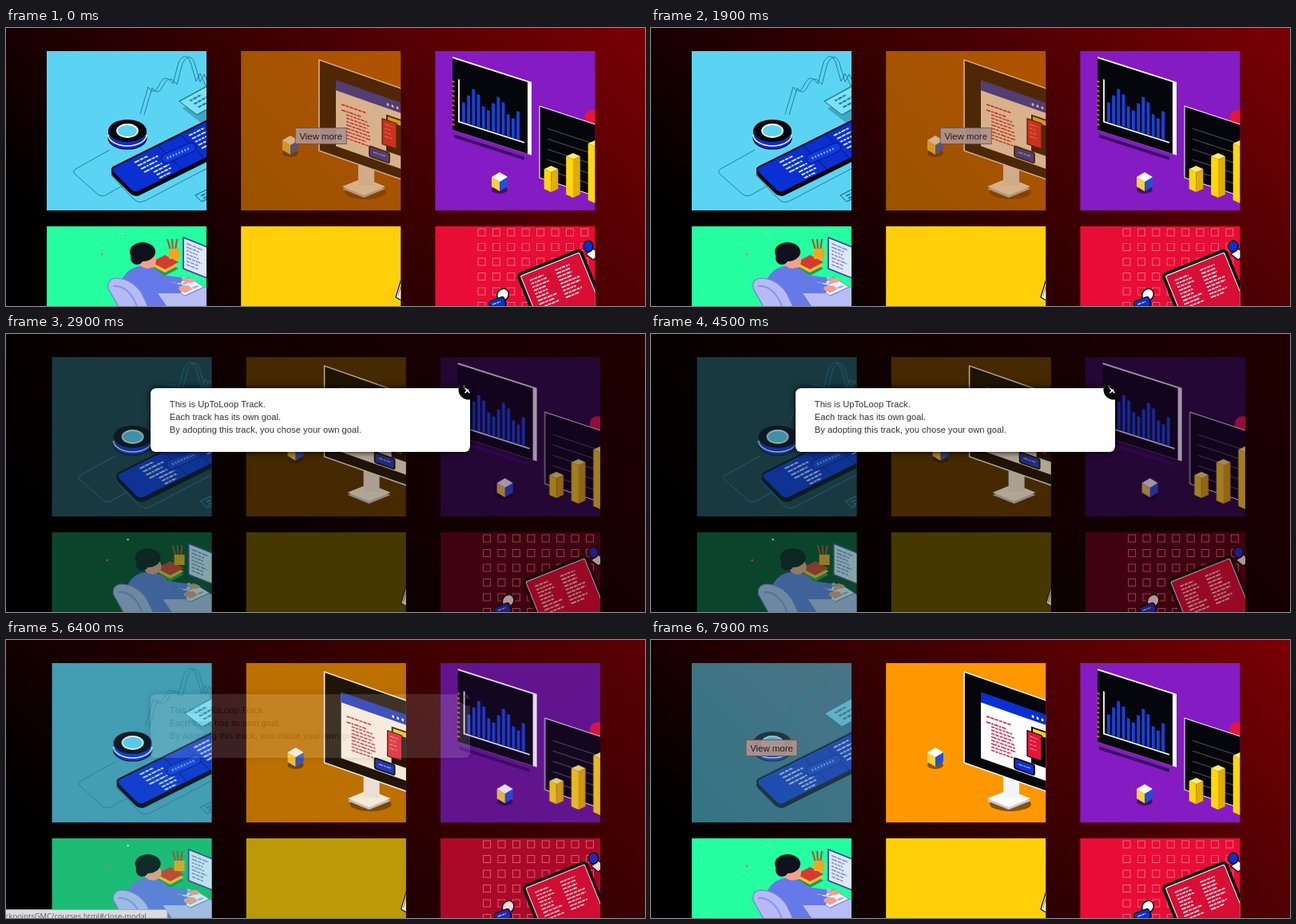
Recreate the animation shown at these times as an HTML page. Size 800 by 349 pixels, loop 8000 ms.

```html
<!DOCTYPE html>
<html lang="en">
<head>
<meta charset="utf-8">
<title>Tracks</title>
<style>
html, body { margin: 0; width: 100%; height: 100%; overflow: hidden; background: #000; }
svg { display: block; width: 100vw; height: 100vh; }
text { font-family: "Liberation Sans", Arial, sans-serif; }
</style>
</head>
<body>
<svg id="stage" viewBox="0 0 800 349" preserveAspectRatio="none"></svg>
<script>
const LOOP = 8000, STEP = 100;
const HOVER_FADE = 500, MODAL_FADE = 220;
const OPEN = 2250, CLOSE = 6270, CLOSED = CLOSE + MODAL_FADE;
const SIZE = 200, SHIFT = 6.6;
const NAVY = '#0a2fd2', INK = '#05050c', TEAL = '#237f98';

let seed = 7;
const rand = () => (seed = (seed * 16807) % 2147483647) / 2147483647;
const repeat = (count, make) => Array.from({ length: count }, (_, i) => make(i)).join('');

const rect = (x, y, w, h, fill, more = '') =>
  `<rect x="${x}" y="${y}" width="${w}" height="${h}" fill="${fill}" ${more}/>`;
const oval = (x, y, rx, ry, fill, more = '') =>
  `<ellipse cx="${x}" cy="${y}" rx="${rx}" ry="${ry}" fill="${fill}" ${more}/>`;
const line = (d, stroke, width = 1, more = '') =>
  `<path d="${d}" fill="none" stroke="${stroke}" stroke-width="${width}" ${more}/>`;
const shape = (d, fill, more = '') => `<path d="${d}Z" fill="${fill}" ${more}/>`;
const edge = (color, width) => `stroke="${color}" stroke-width="${width}" stroke-linejoin="round"`;

// A tilted surface: local x climbs by slope, local y leans sideways by lean.
const plane = (x, y, slope, lean, content) =>
  `<g transform="matrix(1 ${slope} ${lean} 1 ${x} ${y})">${content}</g>`;
const turned = (x, y, angle, content) =>
  `<g transform="translate(${x} ${y}) rotate(${angle})">${content}</g>`;

// Diamond centred on (x, y), w and h being half sizes.
const diamond = (x, y, w, h, fill, more) =>
  shape(`M${x - w} ${y}l${w} ${-h}l${w} ${h}l${-w} ${h}`, fill, more);

// Rows of tiny unreadable words.
const rows = (x, y, width, count, gap, color, weight = 1.5) => repeat(count, i => {
  const dash = `${(3 + 4 * rand()).toFixed(1)} 1 ${(2 + 3 * rand()).toFixed(1)} 1`;
  return line(`M${x} ${y + i * gap}h${width * (0.6 + 0.4 * rand())}`, color, weight, `stroke-dasharray="${dash}"`);
});

// Upright box with a diamond lid; (x, y) is the lid centre.
const box = (x, y, w, h, height, [lid, left, right]) =>
  shape(`M${x - w} ${y}l${w} ${h}v${height}l${-w} ${-h}`, left) +
  shape(`M${x + w} ${y}l${-w} ${h}v${height}l${w} ${-h}`, right) +
  diamond(x, y, w, h, lid);

const cube = (x, y) => oval(x, y + 10, 10, 5, '#000', 'opacity=".45"') +
  box(x, y - 6, 10, 6, 12, ['#fff', '#f7d23a', '#2350d8']);

function phoneScene() {
  const wave = 'M168 108L178 74Q185 86 192 71T209 70L216 43Q225 28 231 43L238 67L243 57L252 77';
  const block = (v, fill, color) => rect(0, v, 170, 31, fill, 'rx="5" ' + edge(color, 1.5));
  const ring = y => oval(152, y, 24, 14, NAVY, edge(INK, 1.2));
  return line(wave, TEAL) + line(wave, TEAL, 1, 'transform="translate(5 1)"') +
    line('M130 153L87 177Q82 180 87 184L115 209Q121 213 128 208L160 190', TEAL) +
    line('M131 184L160 215Q166 221 174 217L252 176', TEAL) +
    plane(217, 98, -0.55, 1.3, rect(0, 3, 60, 18, TEAL, 'opacity=".5"')) +
    plane(217, 92, -0.55, 1.3, rect(0, 0, 60, 17, '#7fe1f7', edge(TEAL, 1)) + rows(8, 4, 20, 3, 4, TEAL)) +
    plane(237, 210, -0.5, 1, rect(0, 0, 40, 8, 'none', edge(TEAL, 1)) + rows(4, 3, 14, 2, 3, TEAL)) +
    plane(130, 181, -0.5, 1, block(0, INK, INK)) +
    plane(130, 177, -0.5, 1, block(0, NAVY, INK) +
      line('M60 1V31M88 1V31', '#061a86') +
      rows(26, 5, 26, 4, 4, '#cfe2ff') + rows(34, 21, 20, 3, 3.6, '#cfe2ff') + rows(94, 5, 20, 5, 4, '#cfe2ff')) +
    turned(216, 157, -24, rect(-23, -6, 46, 12, '#0d3be4', 'rx="6" ' + edge('#051a80', 1.2)) +
      line('M-16 0h32', '#7aa2ff', 3, 'stroke-dasharray="2 2"')) +
    ring(138) + rect(128, 129, 48, 9, NAVY) + line('M128 134a24 14 0 0 0 48 0', '#fff', 1.5) +
    oval(152, 129, 24, 14, INK) + oval(152, 129, 13, 8, '#5bd4f3', edge('#fff', 1.8));
}

function monitorScene() {
  return oval(450, 206, 26, 9, '#4b2b00', 'opacity=".65"') +
    diamond(448, 202, 27, 11, '#c9c9dd') + diamond(448, 199, 27, 11, '#fff') +
    rect(441, 172, 20, 26, '#f4f4fb') +
    plane(392, 40, 0.35, 0,
      rect(0, 0, 120, 114, INK, edge('#fff', 1.6)) +
      rect(21, 19, 90, 82, '#fff') + rect(21, 18, 90, 13, NAVY) +
      repeat(3, i => oval(86 + 6 * i, 26, 1.5, 1.8, '#fff')) +
      rows(28, 46, 32, 2, 7, '#dc1738', 1.7) + rows(34, 57, 34, 8, 4.2, '#dc1738') +
      rect(84, 39, 22, 46, INK) + rect(86, 41, 18, 6, '#ffd11b') +
      rect(79, 46, 18, 32, '#e51639', edge(INK, 1.3)) + rows(82, 52, 12, 4, 5, '#ff9aa8', 1) +
      rect(63, 86, 25, 13, NAVY, 'rx="2" ' + edge(INK, 1.8)) + rows(68, 92, 16, 1, 1, '#89a8ff')) +
    cube(356, 147);
}

function chartScene() {
  const bars = repeat(12, i => {
    const height = 35 + 11 * Math.cos((i - 2.2) * Math.PI * 0.4);
    return rect(12 + 6.2 * i, 76 - height, 3.8, height, '#1444dc');
  });
  const pillars = repeat(3, i =>
    box(682.5 + 27.5 * i, 177 - 16 * i, 8.8, 4, 25 + 23 * i, ['#ffed68', '#ffd60f', '#dfae00']));
  return plane(561, 135, 0.32, 0, rect(0, -1.5, 88, 4, '#3a0863')) +
    plane(559, 38, 0.32, 0,
      rect(0, -2, 99, 92, '#fff') + rect(0, 0, 94, 90, INK) +
      line('M8 24V77H90', '#fff', 1.8) +
      line('M1 28V84', '#ef6546', 3, 'stroke-dasharray="2 4"') + bars) +
    oval(734, 113, 10, 10, '#e5163b') +
    plane(668, 98, 0.33, 0,
      rect(0, 0, 80, 90, INK, edge('#fff', 1)) +
      repeat(5, i => line(`M10 ${25 + 13 * i}h64`, '#555'))) +
    pillars + cube(618, 193);
}

function deskScene() {
  const skin = '#f2a18c', shirt = '#6679e8', books = ['#1f9a5c', '#f5c22d', '#d7382f'];
  return oval(146, 258, 1.3, 1.3, '#fff') + oval(120, 284, 1.3, 1.3, '#f0665c') +
    diamond(222, 338, 50, 26, '#b9bdf6') +
    repeat(3, i => diamond(199, 302 - 4 * i, 17, 9, books[i])) +
    repeat(3, i => line(`M${206 + 3 * i} 279l${3 * i - 4} -14`, '#b5482c', 2)) +
    rect(204, 277, 13, 13, '#f4a51f') +
    plane(222, 263, 0.4, 0, rect(0, 0, 40, 39, '#dfe8ff', edge('#3944a4', 1.8)) + rows(4, 6, 22, 7, 4.4, '#7484e2')) +
    plane(205, 324, -0.45, 1.6,
      rect(0, 0, 24, 12, '#eef0ff', edge('#7a82d4', 0.8)) + rows(3, 3, 18, 3, 3, '#a4acee')) +
    shape('M146 314Q156 297 176 299Q194 302 200 317L222 323L219 333H190L203 352H158', shirt) +
    oval(224, 327, 8, 4, skin) + line('M192 313L220 317', shirt, 7) + oval(229, 317, 7, 3, skin) +
    oval(177, 292, 11, 10, skin) + oval(171, 281, 16, 12, '#10111c') + oval(164, 289, 8, 8, '#10111c') +
    shape('M128 327Q126 315 138 314Q158 315 170 333L179 352H142', '#b6baf7', edge('#757dd5', 1.2)) +
    line('M134 324Q154 322 165 352', '#8d95e8', 2);
}

const laptopScene = () => shape('M500 298L488 338L500 345', '#fff', edge(INK, 1.2)) +
  line('M497 314L491 336', '#777');

function errorScene() {
  const squares = repeat(48, i =>
    rect(591 + 18.4 * (i % 8), 252 + 18.5 * Math.floor(i / 8), 9, 9, 'none', 'stroke="#f4788d" opacity=".85"'));
  return squares +
    turned(641, 310, -22,
      rect(0, 0, 84, 90, '#fff', 'rx="4" ' + edge(INK, 4)) +
      rect(3, 3, 78, 90, '#d90e35', 'rx="2"') +
      rows(11, 12, 26, 9, 4.6, '#ffe5ea', 1.7) + rows(45, 12, 26, 9, 4.6, '#ffe5ea', 1.7)) +
    diamond(735, 284, 9, 7, '#fff', edge(INK, 1.2)) + oval(729, 274, 6, 7, NAVY, edge(INK, 1.5)) +
    turned(622, 335, 35, oval(0, 0, 7, 8, '#fff', edge(INK, 1.5))) +
    turned(615, 345, -20, rect(-10, -5, 20, 12, NAVY, 'rx="3" ' + edge(INK, 1.5)) + rows(-6, 0, 12, 1, 1, '#c9d5ff'));
}

const cards = [
  { color: '#5bd4f3', scene: phoneScene, hovers: [[300, 1200], [7300, 9000]] },
  { color: '#ff9800', scene: monitorScene, hovers: [[-1000, 250], [1250, OPEN], [6900, 7250]] },
  { color: '#851bc2', scene: chartScene, hovers: [[CLOSED, 6850]] },
  { color: '#26ff9f', scene: deskScene, hovers: [] },
  { color: '#ffcf0a', scene: laptopScene, hovers: [] },
  { color: '#e80c36', scene: errorScene, hovers: [] }
];
cards.forEach((card, i) => {
  card.x = 51 + 243.2 * (i % 3);
  card.y = 29 + 220 * Math.floor(i / 3);
});

const tile = (card, i) => `
  <clipPath id="clip${i}">${rect(card.x, card.y, SIZE, SIZE, '#000')}</clipPath>
  ${rect(card.x, card.y, SIZE, SIZE, card.color, `id="tile${i}"`)}`;

const picture = (card, i) => `
  <g clip-path="url(#clip${i})"><g id="art${i}">${card.scene()}</g></g>
  <g id="more${i}">
    ${rect(card.x + 68, card.y + 96.5, 64, 20, '#ae948f', 'stroke="#6f5853" opacity=".92"')}
    <text x="${card.x + 100}" y="${card.y + 110.5}" font-size="11.4" text-anchor="middle" fill="#2b1a1a">View more</text>
  </g>`;

const message = ['This is UpToLoop Track.', 'Each track has its own goal.',
  'By adopting this track, you chose your own goal.'];
const sheet = (fill, more = '') => rect(181, 68, 400, 80, fill, 'rx="6.4" ' + more);

document.getElementById('stage').innerHTML = `
  <defs>
    <linearGradient id="night" gradientUnits="userSpaceOnUse" x1="-100" y1="100" x2="400" y2="-400">
      <stop offset="0" stop-color="#000"/><stop offset="1" stop-color="#7a0004"/>
    </linearGradient>
    <filter id="glow" x="-10%" y="-40%" width="120%" height="180%"><feGaussianBlur stdDeviation="4"/></filter>
    <clipPath id="sheet">${sheet('#000')}</clipPath>
  </defs>
  ${rect(0, 0, 800, 349, 'url(#night)')}
  <g id="tiles">${cards.map(tile).join('')}</g>
  ${rect(0, 0, 800, 349, '#000', 'id="blocker"')}
  <g id="pictures">${cards.map(picture).join('')}</g>
  <g id="modal">
    ${sheet('#000', 'filter="url(#glow)"')}
    <g clip-path="url(#sheet)">
      ${sheet('#fff')}
      ${oval(579, 70, 12.5, 12.5, '#000')}
      ${line('M574.5 68l6 6M574.5 74l6 -6', '#fff', 1.7)}
    </g>
    ${message.map((s, i) => `<text x="204.8" y="${92 + i * 16}" font-size="11.2" fill="#333">${s}</text>`).join('')}
  </g>
  <g id="status">
    ${rect(-4, 338.5, 206, 16, '#dcdcdc', 'rx="3" stroke="#a5a5a5"')}
    <text x="176" y="350" font-size="9.4" text-anchor="end" fill="#5c5c5c" style="font-family:'Open Sans','Noto Sans',sans-serif">checkpointsGMC/courses.html#close-modal</text>
  </g>`;

const set = (id, name, value) => document.getElementById(id).setAttribute(name, value);
const fade = (id, value) => set(id, 'opacity', value.toFixed(3));

// Smooth 0..1 ramp that starts at a given time.
function ramp(t, start, length) {
  const p = Math.min(1, Math.max(0, (t - start) / length));
  return 0.5 - 0.5 * Math.cos(Math.PI * p);
}
const pulse = (t, on, off, length) => Math.min(ramp(t, on, length), 1 - ramp(t, off, length));

function draw(t) {
  const dim = pulse(t, OPEN, CLOSE, MODAL_FADE);
  cards.forEach((card, i) => {
    const level = Math.max(0, ...card.hovers.map(([on, off]) => pulse(t, on, off, HOVER_FADE)));
    fade('tile' + i, 1 - 0.45 * level);
    // Artwork keeps more contrast than the flat tiles while dimmed.
    fade('art' + i, (1 - 0.45 * level) * (1 - 0.42 * dim));
    fade('more' + i, level * (1 - dim));
  });
  const shift = t >= OPEN && t < CLOSED ? SHIFT : 0;
  set('tiles', 'transform', `translate(${shift} 0)`);
  set('pictures', 'transform', `translate(${shift} 0)`);
  fade('blocker', 0.73 * dim);
  fade('modal', dim * pulse(t, OPEN + MODAL_FADE, CLOSE, MODAL_FADE));
  fade('status', pulse(t, 5800, 6950, 150));
}

const began = performance.now();
function tick() {
  const elapsed = (performance.now() - began) % LOOP;
  draw(Math.floor(elapsed / STEP) * STEP);
  requestAnimationFrame(tick);
}
tick();
</script>
</body>
</html>
```
